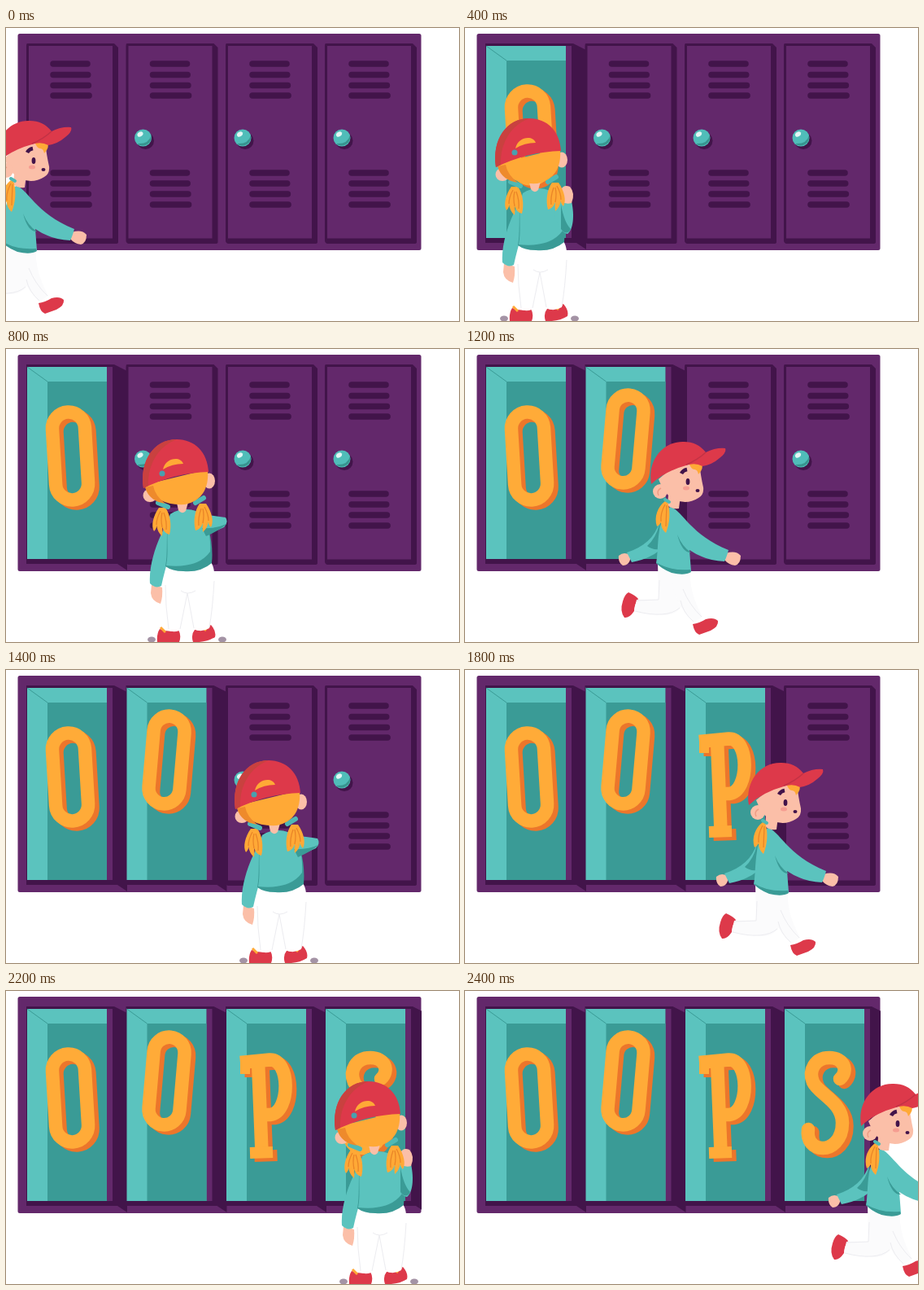
Animation of 557 by 360 pixels, one loop 2600 ms. Source, as an HTML page:

```html
<!DOCTYPE html>
<html lang="en">
<head>
<meta charset="utf-8">
<title>Oops lockers</title>
<style>
html, body { margin: 0; width: 100%; height: 100%; overflow: hidden; background: #fff; }
svg { display: block; width: 100vw; height: 100vh; }
.purple { fill: #63286b; } .dark { fill: #42144a; }
.teal { fill: #5bc3be; } .deep { fill: #3a9b96; }
.red { fill: #dd394a; } .hair { fill: #ffa936; } .skin { fill: #fbbfa8; }
.white { fill: #fff; } .pale { fill: #fbfbfc; }
.vent { stroke: #42144a; stroke-width: 7.5; stroke-linecap: round; }
.letter { fill: none; stroke-width: 16.5; stroke-linejoin: round; }
.fold { fill: none; stroke: #ececf0; stroke-width: 1; }
.strand { fill: none; stroke: #e98528; stroke-width: 1.3; }
</style>
</head>
<body>
<svg viewBox="0 0 557 360" preserveAspectRatio="none">
  <defs>
    <clipPath id="frame"><path d="M14 6H511V273H14Z"/></clipPath>
    <g id="vents"></g>
    <g id="knob">
      <circle class="dark" cx="145" cy="138.500" r="10.500"/>
      <circle cx="142" cy="135" r="10.500" fill="#50bdb9"/>
      <path d="M135 142A10.5 10.5 0 0 0 152 132Q149 143 135 142" fill="#37948f"/>
      <ellipse cx="138.500" cy="130.500" rx="3.800" ry="2.800" fill="#e3f7f5" transform="rotate(-35 138.500 130.500)"/>
    </g>

    <!-- Local x runs from the left edge of each locker -->
    <g id="shut">
      <path class="dark" d="M0 19H107L112 24V263Q112 265 109 265H2Q-1 264-1 261V22Q-1 19 0 19"/>
      <path class="purple" d="M2 22H105V258.500H2Z"/>
      <use href="#vents"/>
    </g>
    <g id="open">
      <path class="dark" d="M-1 19H107L123 27V272L111 264H-1Z"/>
      <path class="purple" d="M98 22H105V258H98Z"/>
      <path class="teal" d="M0 22H98V258H0Z"/>
      <path class="deep" d="M25 40H98V258H25Z"/>
      <path d="M0 22L25 40" stroke="#3a9b96"/>
    </g>

    <g id="L0"><rect x="59" y="77.500" width="40" height="108" rx="20" transform="rotate(-3.500 79 131)"/></g>
    <g id="L1"><rect x="178.500" y="56.500" width="38" height="108" rx="19" transform="rotate(5 197.500 111)"/></g>
    <g id="L2">
      <path d="M310 86L314.500 198"/>
      <path d="M288 88L324 84.500C350 83 350 149 325 152L314 152"/>
      <path d="M294 88V102" stroke-width="12"/>
      <path d="M300 199L328 198" stroke-width="14"/>
    </g>
    <g id="L3" stroke-linecap="round">
      <path d="M461 108C472 98 466 82 448 82C430 82 422 98 428 112C434 126 464 136 464 162C464 184 450 193 440 193C428 193 420 184 422 170"/>
    </g>

    <g id="tail">
      <path class="hair" d="M-3 0C-10 10-13 22-9 29Q-5 25-6 21Q-5 30 1 35Q2 29 1 24Q4 32 10 33C13 22 11 8 5 0Z"/>
      <path class="strand" d="M-1 4Q-6 13-6 21M1 6Q-1 14 1 24M3 6Q7 17 6 27"/>
    </g>

    <g id="back">
      <ellipse cx="179" cy="357" rx="5" ry="3.500" fill="#a493a5"/>
      <ellipse cx="266" cy="357" rx="5" ry="3.500" fill="#a493a5"/>
      <path class="red" d="M189 344Q201 349 212 345Q216 352 213 360H186Q185 350 189 344M232 345Q243 347 252 339Q259 347 257 354Q246 361 230 360Q227 351 232 345"/>
      <path d="M190 342L196 348M250 338L244 346" stroke="#ffa936" stroke-width="3"/>
      <path class="white" d="M196 262H252Q255 266 256 274C258 298 253 320 250 343Q240 349 231 344L224 303L213 346Q205 349 199 345C198 315 191 292 196 262"/>
      <path class="fold" d="M196 290Q196 315 200 344M256 285Q254 320 250 342M214 344L223 300L231 343M215 297Q223 303 233 297"/>
      <path class="skin" d="M179 289L192 293Q193 304 190 313Q179 310 178 300Z"/>
      <path class="teal" d="M204 204C190 225 175 260 177 288Q184 295 191 291C196 268 204 243 211 218Z"/>
    </g>
    <g id="torso">
      <path class="deep" d="M202 203Q218 193 236 200C250 213 255 238 253 263Q239 275 218 273Q204 273 196 267C200 245 195 222 202 203"/>
      <path class="teal" d="M202 203Q218 193 236 200C249 212 252 230 251 249Q236 270 197 266C201 245 195 222 202 203"/>
      <path class="skin" d="M209 185H225L221 199Q216 204 212 198Z"/>
    </g>
    <g id="reach">
      <path class="teal" d="M238 203Q258 205 270 207Q274 213 268 219Q257 224 246 229Z"/>
      <path class="deep" d="M241 220Q258 221 271 215Q264 222 246 230Z"/>
    </g>
    <g id="pull">
      <path class="teal" d="M238 201L251 214L262 213C266 231 264 248 257 253Q249 252 241 232Z"/>
      <path class="deep" d="M249 217Q253 239 261 247Q256 256 249 247Z"/>
      <path class="skin" d="M249 199Q252 192 260 195Q267 203 262 215Q255 217 249 213Z"/>
    </g>
    <g id="nape">
      <use href="#tail" x="191" y="195"/>
      <use href="#tail" transform="translate(243 190) scale(-1 1)"/>
      <path d="M187 189L199 194M233 189L243 183" stroke="#4fb9b5" stroke-width="6" stroke-linecap="round"/>
      <ellipse class="skin" cx="177" cy="180" rx="8.500" ry="8"/>
      <ellipse class="skin" cx="250" cy="162" rx="7" ry="9.500"/>
      <path class="hair" d="M170 167L248 148C250 172 240 187 220 191Q186 193 170 167"/>
      <path d="M171 170Q176 187 196 190Q183 180 181 168Z" fill="#ee8a2c"/>
      <path class="red" d="M169 171C164 137 182 111 210 111C232 111 248 127 249 151Q208 152 169 171"/>
      <path d="M169 171C164 137 182 111 210 111C188 119 174 141 175 168Z" fill="#c9413f"/>
      <path class="hair" d="M193 148C196 134 214 131 218 141Q204 141 193 148"/>
      <circle cx="192" cy="153" r="3.500" fill="#4a9fae"/>
    </g>

    <g id="walk">
      <path class="skin" d="M309 254Q316 248 324 254Q323 266 314 266Q308 262 309 254"/>
      <path class="teal" d="M359 213C353 232 340 243 319 250L325 262Q347 258 361 246Z"/>
      <path class="deep" d="M359 215Q355 232 344 242Q350 247 359 246Z"/>
      <path class="red" d="M321 299Q330 303 333 307Q328 314 328 322Q322 331 316 330Q310 322 314 310Q316 302 321 299"/>
      <path class="pale" d="M357 262L397 270C398 291 394 306 385 318Q375 330 358 326L328 322L331 308L358 308Z"/>
      <path class="pale" d="M372 270L397 271Q395 298 412 329L401 336Q385 320 377 299Z"/>
      <path class="fold" d="M331 309L358 308L359 284M329 322Q368 332 384 318M388 295Q396 315 411 329M401 335Q388 324 385 309"/>
      <path class="red" d="M400 338Q408 337 416 332Q426 329 431 334Q432 341 422 346L408 351Q402 349 400 338"/>
      <path class="skin" d="M441 251Q453 247 459 254Q459 264 452 266Q444 265 439 259Z"/>
      <path class="teal" d="M372 194C386 196 396 228 444 247Q442 255 439 261Q415 260 396 247L398 273Q390 279 374 274Q361 270 355 263C359 242 354 215 372 194"/>
      <path class="deep" d="M381 228Q387 243 398 250Q387 251 381 228M355 262Q372 273 397 271L398 274Q390 279 374 275Q361 270 355 262"/>
      <path class="skin" d="M370 180H385L383 196Q374 197 369 192Z"/>
      <path class="skin" d="M358 160Q382 137 408 140Q410 157 413 170Q414 179 407 183Q393 192 377 185Q365 179 358 160"/>
      <circle class="skin" cx="360" cy="175" r="9"/>
      <path d="M358 180Q355 174 361 171" fill="none" stroke="#ee9d85" stroke-width="1.500"/>
      <path class="hair" d="M394 138L411 139Q414 147 407 154Q406 148 402 148Q398 148 394 138"/>
      <path class="hair" d="M366 187C357 194 352 206 356 218Q359 217 361 213Q361 221 367 226C372 214 373 199 369 188Z"/>
      <path class="strand" d="M366 191Q360 202 361 212M368 192L367 218"/>
      <path d="M366 185L371 188" stroke="#4fb9b5" stroke-width="4" stroke-linecap="round"/>
      <path class="red" d="M349 166C344 136 364 113 389 114Q406 114 416 127Q428 121 440 122Q442 127 433 134Q424 142 412 144Q403 139 392 143Q366 150 349 166"/>
      <path d="M392 142Q405 137 416 127" fill="none" stroke="#c23245" stroke-width="1.500"/>
      <path d="M386 153Q388 149 393 148" fill="none" stroke="#42144a" stroke-width="4.500"/>
      <ellipse class="dark" cx="394" cy="163" rx="2.400" ry="4"/>
      <ellipse class="dark" cx="406" cy="174" rx="2.500" ry="2"/>
      <ellipse cx="392" cy="171" rx="4" ry="2.500" fill="#f59d91"/>
    </g>
  </defs>
  <rect class="purple" x="14.500" y="7" width="496" height="266" rx="2.500"/>
  <g id="lockers" clip-path="url(#frame)"></g>
  <g id="girl"></g>
</svg>
<script>
const $ = id => document.getElementById(id);
const use = (id, x = 0, y = 0, extra = '') => `<use href="#${id}" x="${x}" y="${y}" ${extra}/>`;
const lockerX = [26, 148.5, 271, 393];
const walkX = [-360, -240, -120, 0, 138];
const standX = [-131, 0, 113, 236];

$('vents').innerHTML = [44, 57.5, 70.5, 83, 178, 191, 204, 217]
  .map((y, i) => `<path class="vent" d="M32 ${y}H${74 + i % 4 * .7}"/>`).join('');

const letter = i => '<g class="letter">' +
  use('L' + i, 5.5, 4, 'stroke="#ec762b"') + use('L' + i, 0, 0, 'stroke="#ffab38"') + '</g>';

// Each locker takes three steps: walk up, reach, pull open.
function draw(step) {
  const at = Math.floor(step / 3), pose = step % 3;
  $('lockers').innerHTML = lockerX.map((x, i) => {
    if (i < at || (i === at && pose === 2)) return use('open', x) + letter(i);
    const hidden = i === at && pose === 0;
    return use('shut', x) + (hidden ? '' : use('knob', x - 122));
  }).join('');
  const parts = pose ? ['back', 'torso', pose === 1 ? 'reach' : 'pull', 'nape'] : ['walk'];
  const x = (pose ? standX : walkX)[at];
  $('girl').innerHTML = parts.map(p => use(p, x)).join('');
}

let shown = -1, start;
function tick(now) {
  start ??= now;
  const step = Math.floor((now - start) / 200) % 13;
  if (step !== shown) draw(shown = step);
  requestAnimationFrame(tick);
}
draw(0);
requestAnimationFrame(tick);
</script>
</body>
</html>
```
